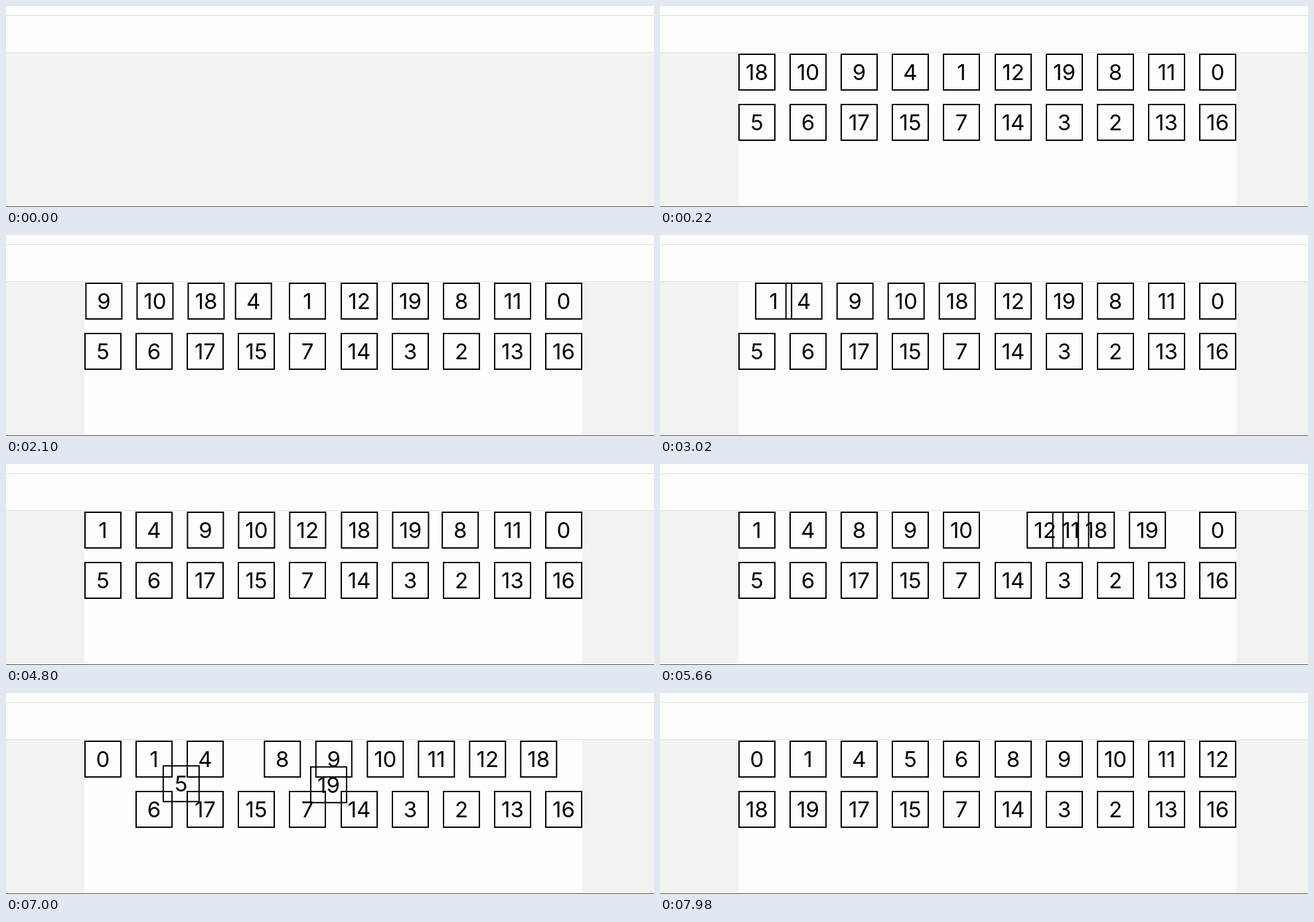
Animation of 976 by 304 pixels, one loop 8 s. Source, as an HTML page:

```html
<!DOCTYPE html>
<html lang="en">
<head>
<meta charset="utf-8">
<title>Insertion sort</title>
<style>
  html, body { margin: 0; width: 100%; height: 100%; overflow: hidden; }
  body { position: relative; background: #f2f2f0; }
  .head, .rule, .foot, .panel, .tile { position: absolute; }
  .head { left: 0; right: 0; top: 0; height: 70px; background: #fdfdfc; }
  .rule { left: 0; right: 0; height: 1px; background: #deded6; }
  .foot { left: 0; right: 0; top: 303px; height: 1px; background: #555; }
  .panel { left: 118px; top: 71px; width: 750px; height: 232px; background: #fdfdfc; }
  .tile {
    left: 0; top: 0; width: 56px; height: 56px; box-sizing: border-box;
    border: 2px solid #000; color: #000; text-align: center;
    font: 33px/53px Inter, sans-serif;
  }
</style>
</head>
<body>
<div class="head"></div>
<div class="rule" style="top:14px"></div>
<div class="rule" style="top:70px"></div>
<div id="list"><div class="panel"></div></div>
<div class="foot"></div>
<script>
const LOOP = 8000, MOUNT = 100, MOVE = 340;
const starts = [705, 1386, 2068, 2749, 3428, 4106, 4784, 5466, 6148, 6829, 7511];
const first = [18, 10, 9, 4, 1, 12, 19, 8, 11, 0, 5, 6, 17, 15, 7, 14, 3, 2, 13, 16];
const list = document.getElementById('list');

// One order per insertion step
const orders = [first];
starts.forEach((_, i) => {
  const next = orders[i].slice();
  const [value] = next.splice(i + 1, 1);
  let at = 0;
  while (at <= i && next[at] < value) at++;
  next.splice(at, 0, value);
  orders.push(next);
});

const tiles = first.map(value => {
  const el = document.createElement('div');
  el.className = 'tile';
  el.textContent = value;
  list.append(el);
  return { value, el };
});

const slot = i => [Math.round(118 + (i % 10) * 694 / 9), 72 + 76 * Math.floor(i / 10)];

// cubic-bezier(.42, 0, .58, 1)
function easeInOut(x) {
  if (x <= 0) return 0;
  if (x >= 1) return 1;
  let lo = 0, hi = 1, s = 0.5;
  for (let i = 0; i < 24; i++) {
    s = (lo + hi) / 2;
    const bx = 1.26 * (1 - s) ** 2 * s + 1.74 * (1 - s) * s * s + s ** 3;
    if (bx < x) lo = s; else hi = s;
  }
  return s * s * (3 - 2 * s);
}

function draw(t) {
  list.style.visibility = t < MOUNT ? 'hidden' : 'visible';
  const step = starts.filter(s => s <= t).length;
  const to = orders[step], from = orders[Math.max(0, step - 1)];
  const p = step ? easeInOut((t - starts[step - 1]) / MOVE) : 1;
  for (const { value, el } of tiles) {
    const [x0, y0] = slot(from.indexOf(value));
    const [x1, y1] = slot(to.indexOf(value));
    el.style.transform = `translate(${x0 + (x1 - x0) * p}px, ${y0 + (y1 - y0) * p}px)`;
  }
}

const begin = performance.now();
function tick() {
  draw((performance.now() - begin) % LOOP);
  requestAnimationFrame(tick);
}
draw(0);
requestAnimationFrame(tick);
</script>
</body>
</html>
```
